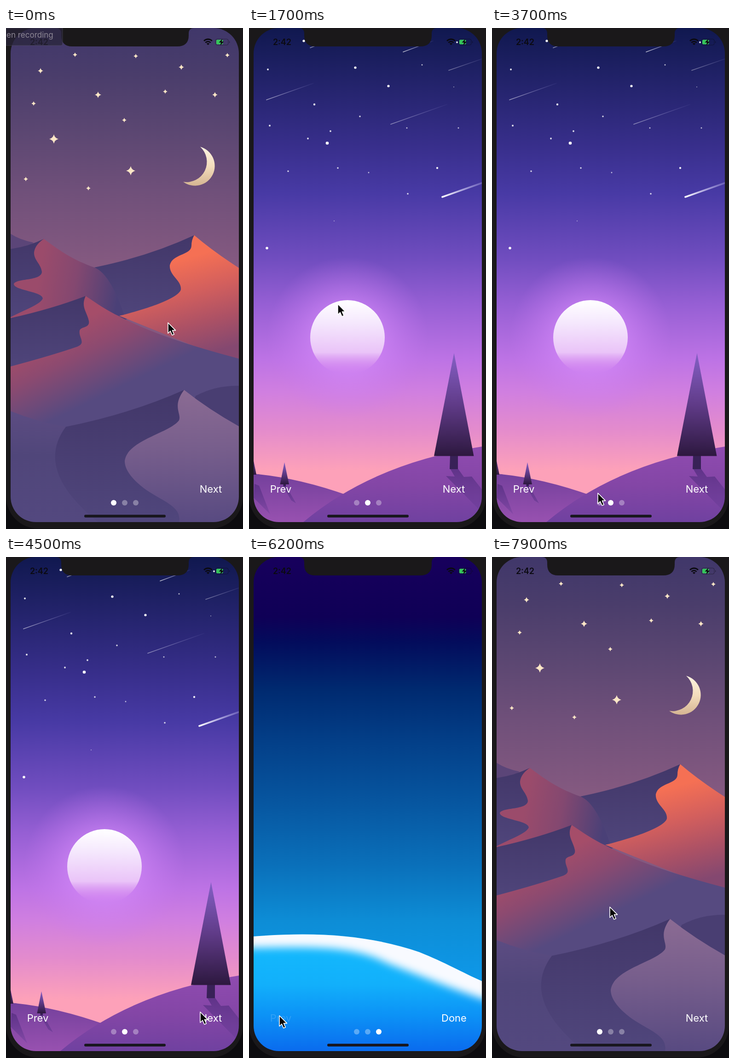
Recreate the animation shown at these times as an HTML page. Size 515 by 1088 pixels, loop 8 s.

```html
<!DOCTYPE html>
<html lang="en">
<head>
<meta charset="utf-8">
<title>Onboarding pages</title>
<style>
html, body { margin: 0; width: 100%; height: 100%; overflow: hidden; background: #1a181a; }
svg { display: block; width: 515px; height: 1088px; font-family: Inter, Roboto, sans-serif; }
.label { font-size: 22px; fill: #fff; text-anchor: middle; }
.strip, .cursor, .tip, .dot, .press { animation: 8s infinite; }
.strip { animation-name: swipe; animation-timing-function: ease-out; }
.cursor { animation-name: point; animation-timing-function: ease-in-out; }
.tip { animation-name: tip; animation-timing-function: linear; }
.dot { fill: #fff; fill-opacity: .33; animation-timing-function: step-end; }
.press { animation-timing-function: step-end; }
.d0 { animation-name: dot0; }
.d1 { animation-name: dot1; }
.d2 { animation-name: dot2; }
.n0 { animation-name: next0; }
.n1 { animation-name: next1; }
.p1 { animation-name: prev1; }
.p2 { animation-name: prev2; }
@keyframes swipe {
  0%, 1.5% { transform: translateX(0); }
  6.5% { transform: translateX(-486px); }
  8% { transform: translateX(-504px); }
  8.7%, 9.4% { transform: translateX(-556px); }
  13%, 17% { transform: translateX(-992px); }
  21%, 22.5% { transform: translateX(-496px); }
  27%, 37.5% { transform: translateX(0); }
  41.25%, 58% { transform: translateX(-496px); }
  62%, 78.2% { transform: translateX(-992px); }
  82%, 87% { transform: translateX(-496px); }
  91%, 100% { transform: translateX(0); }
}
@keyframes point {
  0%, 1.2% { transform: translate(352px, 640px); }
  6%, 18% { transform: translate(-60px, 650px); }
  22.5% { transform: translate(240px, 590px); }
  28%, 32% { transform: translate(418px, 568px); }
  36%, 41% { transform: translate(445px, 996px); }
  46.25%, 47% { transform: translate(230px, 1010px); }
  50% { transform: translate(150px, 1005px); }
  56%, 65% { transform: translate(422px, 988px); }
  76%, 88% { transform: translate(66px, 996px); }
  98%, 100% { transform: translate(256px, 760px); }
}
@keyframes tip { 0%, .8% { opacity: 1; } 3%, 100% { opacity: 0; } }
@keyframes dot0 { 0%, 27%, 91% { fill-opacity: 1; } 13%, 41.25% { fill-opacity: .33; } }
@keyframes dot1 { 0%, 27%, 62%, 91% { fill-opacity: .33; } 21%, 41.25%, 82% { fill-opacity: 1; } }
@keyframes dot2 { 0%, 21%, 82% { fill-opacity: .33; } 13%, 62% { fill-opacity: 1; } }
@keyframes next0 { 0%, 37.5% { opacity: 1; } 36.5% { opacity: .15; } }
@keyframes next1 { 0%, 58% { opacity: 1; } 57% { opacity: .15; } }
@keyframes prev1 { 0%, 87% { opacity: 1; } 86% { opacity: .15; } }
@keyframes prev2 { 0%, 78.6% { opacity: 1; } 77% { opacity: .15; } }
</style>
</head>
<body>
<svg viewBox="0 0 515 1088">
  <defs>
    <clipPath id="screen"><rect x="10" width="496" height="1073" rx="55"/></clipPath>
    <clipPath id="page"><rect x="10" width="496" height="1073"/></clipPath>
    <clipPath id="planet"><use href="#dome"/></clipPath>
    <filter id="soft" x="-20%" y="-50%" width="140%" height="200%"><feGaussianBlur stdDeviation="9"/></filter>

    <linearGradient id="dusk" gradientUnits="userSpaceOnUse" x1="0" y1="0" x2="0" y2="510">
      <stop stop-color="#40376a"/><stop offset=".2" stop-color="#4a3d6b"/>
      <stop offset=".45" stop-color="#5c4772"/><stop offset=".7" stop-color="#70507a"/>
      <stop offset="1" stop-color="#845980"/>
    </linearGradient>
    <linearGradient id="crescent" x2="0" y2="1">
      <stop stop-color="#fdf3e2"/><stop offset=".5" stop-color="#f3dcbc"/><stop offset="1" stop-color="#d5b592"/>
    </linearGradient>
    <linearGradient id="shade" x2="0" y2="1">
      <stop stop-color="#423769"/><stop offset="1" stop-color="#50467c"/>
    </linearGradient>
    <linearGradient id="rose" gradientUnits="userSpaceOnUse" x1="70" y1="545" x2="245" y2="575">
      <stop stop-color="#9b4b6b"/><stop offset=".45" stop-color="#844870"/><stop offset="1" stop-color="#4a4077"/>
    </linearGradient>
    <linearGradient id="ember" gradientUnits="userSpaceOnUse" x1="370" y1="505" x2="425" y2="710">
      <stop stop-color="#f57054"/><stop offset=".35" stop-color="#d35f5d"/>
      <stop offset=".68" stop-color="#ac5165"/><stop offset="1" stop-color="#844870"/>
    </linearGradient>
    <linearGradient id="slope" gradientUnits="userSpaceOnUse" x1="150" y1="640" x2="224" y2="792">
      <stop stop-color="#a54d69"/><stop offset=".4" stop-color="#8c4a70"/><stop offset="1" stop-color="#564a80"/>
    </linearGradient>
    <linearGradient id="floor" x2="0" y2="1">
      <stop stop-color="#5c4c82"/><stop offset=".4" stop-color="#50467a"/><stop offset="1" stop-color="#53487f"/>
    </linearGradient>
    <linearGradient id="lilac" x2="0" y2="1">
      <stop stop-color="#8b6b93"/><stop offset=".45" stop-color="#775e8c"/><stop offset="1" stop-color="#584a81"/>
    </linearGradient>

    <linearGradient id="violet" gradientUnits="userSpaceOnUse" x1="0" y1="0" x2="0" y2="1000">
      <stop stop-color="#10184f"/><stop offset=".12" stop-color="#23236b"/><stop offset=".25" stop-color="#372e8a"/>
      <stop offset=".36" stop-color="#483aa5"/><stop offset=".5" stop-color="#704dbf"/>
      <stop offset=".6" stop-color="#965fd4"/><stop offset=".72" stop-color="#bd73e5"/>
      <stop offset=".79" stop-color="#d07fe0"/><stop offset=".87" stop-color="#e38bcd"/>
      <stop offset=".96" stop-color="#fda1b9"/>
    </linearGradient>
    <radialGradient id="glow"><stop offset=".4" stop-color="#d489fa" stop-opacity=".65"/><stop offset="1" stop-color="#c878f0" stop-opacity="0"/></radialGradient>
    <linearGradient id="fullmoon" x2="0" y2="1">
      <stop stop-color="#fff"/><stop offset=".3" stop-color="#f5e8fd"/>
      <stop offset=".7" stop-color="#eac4f8"/><stop offset=".98" stop-color="#d685ea" stop-opacity="0"/>
    </linearGradient>
    <linearGradient id="streak" y1="1" x2="1" y2="0"><stop stop-color="#fff"/><stop offset="1" stop-color="#b9b0f5" stop-opacity=".1"/></linearGradient>
    <linearGradient id="hill" x2="0" y2="1"><stop stop-color="#8f4bb0"/><stop offset=".5" stop-color="#8446a6"/><stop offset="1" stop-color="#7041a0"/></linearGradient>
    <linearGradient id="farhill" x2="0" y2="1"><stop stop-color="#74409c"/><stop offset="1" stop-color="#9851b0"/></linearGradient>
    <linearGradient id="pine" x2="0" y2="1"><stop stop-color="#8560c6"/><stop offset=".5" stop-color="#603b88"/><stop offset="1" stop-color="#2d183f"/></linearGradient>
    <linearGradient id="cast" x2="0" y2="1"><stop stop-color="#5f3388"/><stop offset="1" stop-color="#653a94" stop-opacity=".3"/></linearGradient>

    <linearGradient id="space" gradientUnits="userSpaceOnUse" x1="0" y1="0" x2="0" y2="930">
      <stop stop-color="#17005c"/><stop offset=".14" stop-color="#0f0056"/><stop offset=".2" stop-color="#030c5c"/>
      <stop offset=".31" stop-color="#002a70"/><stop offset=".43" stop-color="#033f88"/>
      <stop offset=".58" stop-color="#0757a1"/><stop offset=".72" stop-color="#0a70ba"/>
      <stop offset=".85" stop-color="#0d8dd6"/><stop offset="1" stop-color="#0e99ea"/>
    </linearGradient>
    <linearGradient id="sea" gradientUnits="userSpaceOnUse" x1="0" y1="850" x2="0" y2="1073">
      <stop stop-color="#13b8fd"/><stop offset=".35" stop-color="#12b0fb"/><stop offset=".65" stop-color="#0c92f6"/><stop offset="1" stop-color="#0a6bee"/>
    </linearGradient>
    <path id="dome" d="M10 824 C160 812 270 824 370 858 C425 880 465 903 506 921 V1073 H10Z"/>
  </defs>

  <path d="M0 0H515V1088H0Z" fill="#0d0c0f"/>
  <rect y="-80" width="515" height="1167" rx="70" fill="#1a181a"/>

  <g clip-path="url(#screen)">
    <g class="strip">
      <g clip-path="url(#page)">
        <path d="M10 0H506V1073H10Z" fill="url(#dusk)"/>
        <g id="sparkles" fill="#fbe6c6"></g>
        <path d="M422 258A43 43 0 1 1 385 334A44 44 0 0 0 422 258Z" fill="url(#crescent)"/>
        <path d="M10 447Q30 460 60 466L10 500Z" fill="#5b4578"/>
        <path d="M192 520Q310 496 409 450L420 560L246 640H150Z" fill="url(#shade)"/>
        <path d="M10 480Q50 474 82 458L110 600L10 640Z" fill="url(#shade)"/>
        <path d="M82 458C110 478 140 502 192 520Q230 535 262 640L10 700V628C40 612 76 600 80 587C78 572 18 570 17 556C22 543 76 550 78 530C76 512 60 504 61 487Q63 471 82 458Z" fill="url(#rose)"/>
        <path d="M409 450Q450 485 506 521V730L246 625C300 612 375 588 380 568C382 548 354 538 356 515C362 490 402 494 403 473Q403 460 409 450Z" fill="url(#ember)"/>
        <path d="M10 630Q100 610 173 582L195 660L150 720L10 750Z" fill="url(#shade)"/>
        <path d="M173 582C200 600 220 614 246 626Q330 672 506 718V920H10V735Q100 711 155 692C175 684 157 672 160 657C163 648 183 652 180 636C176 616 162 606 173 582Z" fill="url(#slope)"/>
        <path d="M10 832Q70 856 130 866L300 850L506 900V1073H10Z" fill="url(#floor)"/>
        <path d="M412 799Q455 776 506 777V900L400 830Z" fill="#493e72"/>
        <path d="M130 866Q270 838 387 786L400 1073H200Q60 960 130 866Z" fill="url(#shade)"/>
        <path d="M387 786Q440 828 506 865V1073H376C382 1040 345 1030 306 1004C278 984 258 962 258 940C264 895 355 880 376 852C382 837 360 822 387 786Z" fill="url(#lilac)"/>
        <text class="label press n0" x="445" y="1009">Next</text>
      </g>

      <g transform="translate(496)">
        <g clip-path="url(#page)">
          <path d="M10 0H506V1073H10Z" fill="url(#violet)"/>
          <g id="stars" fill="#fff"></g>
          <g stroke="url(#streak)" stroke-width="1.6" stroke-linecap="round">
            <path d="M38 156L140 120" opacity=".55"/>
            <path d="M308 209L430 166" opacity=".45"/>
            <path d="M335 52L400 28" opacity=".7"/>
            <path d="M434 92L515 64" opacity=".4"/>
            <path d="M133 43L180 25" opacity=".5"/>
            <path d="M420 367L530 328" stroke-width="3.6"/>
          </g>
          <circle cx="214" cy="672" r="175" fill="url(#glow)"/>
          <circle cx="214" cy="672" r="81" fill="url(#fullmoon)"/>
          <path d="M10 968Q105 976 215 1015V1073H10Z" fill="url(#farhill)"/>
          <path d="M12 990L22 994L46 1056L10 1020ZM74 995H81L102 1032L92 1026Z" fill="url(#cast)"/>
          <path d="M4 910L-8 970H16Z" fill="url(#pine)"/>
          <path d="M77 943L67.500 991H87Z" fill="url(#pine)"/>
          <path d="M74.500 991H80V995H74.500Z" fill="#341f52"/>
          <path d="M118 1073Q270 945 506 909V1073Z" fill="url(#hill)"/>
          <path d="M437 957H454L467 975L484 974L506 1002V1052L428 973L447 974Z" fill="url(#cast)"/>
          <path d="M437 929H454V958H436Z" fill="#382157"/>
          <path d="M445.500 706L402 929.500H488.500Z" fill="url(#pine)"/>
          <text class="label press p1" x="69" y="1009">Prev</text>
          <text class="label press n1" x="445" y="1009">Next</text>
        </g>
      </g>

      <g transform="translate(992)">
        <g clip-path="url(#page)">
          <path d="M10 0H506V1073H10Z" fill="url(#space)"/>
          <use href="#dome" fill="url(#sea)"/>
          <g clip-path="url(#planet)">
            <path d="M-40 800H380L560 900V976C470 950 380 912 300 882C225 843 140 846 -40 850Z" fill="#f8faff" filter="url(#soft)"/>
          </g>
          <text class="label press p2" x="69" y="1009">Prev</text>
          <text class="label" x="445.500" y="1009">Done</text>
        </g>
      </g>
    </g>

    <circle class="dot d0" cx="234" cy="1031" r="6"/>
    <circle class="dot d1" cx="258" cy="1031" r="6"/>
    <circle class="dot d2" cx="282" cy="1031" r="6"/>
    <rect x="170" y="1057" width="177" height="6" rx="3" fill="#19171f"/>

    <text x="72" y="37" font-size="18" font-weight="600" text-anchor="middle" fill="#0b0a10">2:42</text>
    <g fill="none" stroke="#0b0a10" stroke-width="2.700">
      <path d="M430 28Q439 20.500 448 28M433.300 31.800Q439 27 444.700 31.800"/>
      <path d="M439 37L435.800 34Q439 31.500 442.200 34Z" fill="#0b0a10" stroke="none"/>
    </g>
    <rect x="455.500" y="24" width="27.500" height="13" rx="3.500" fill="none" stroke="#0b0a10" stroke-opacity=".45"/>
    <path d="M485 28.500Q488 30.500 485 33Z" fill="#0b0a10" fill-opacity=".45"/>
    <rect x="457" y="25.500" width="14.500" height="10" rx="2" fill="#36c65c"/>
    <path d="M470 23.500L462.500 31.500H467L465.500 38L473.500 29.500H468.700Z" fill="#0b0a10"/>
  </g>

  <path d="M108 0Q120 0 120 12V16Q120 40 144 40H372Q397 40 397 16V12Q397 0 409 0Z" fill="#1a181a"/>

  <g class="tip">
    <path d="M0 0H123V34Q123 38 119 38H0Z" fill="#29243a" fill-opacity=".72" stroke="#5b5666" stroke-opacity=".5"/>
    <text x="1" y="21" font-size="17" fill="#8d8794">en recording</text>
  </g>

  <g class="cursor">
    <path d="M0 0V23L5.200 18.200L9 27L13.200 25.200L9.500 16.600H16.500Z" fill="#050505" stroke="#fff" stroke-width="1.600" stroke-linejoin="round"/>
  </g>
</svg>
<script>
const SVG = "http://www.w3.org/2000/svg";
const add = (parent, tag, attrs) => {
  const el = document.createElementNS(SVG, tag);
  for (const key in attrs) el.setAttribute(key, attrs[key]);
  document.getElementById(parent).append(el);
};

const sparkles = [[75, 93, 6], [150, 58, 5], [282, 61, 5], [381, 85, 6], [481, 59, 5],
  [60, 164, 5], [200, 145, 7], [346, 138, 5], [454, 145, 6], [257, 200, 5],
  [104, 241, 10], [271, 310, 10], [43, 328, 5], [179, 348, 5]];
for (const [x, y, r] of sparkles) {
  const k = r * .2;
  add("sparkles", "path", {
    transform: `translate(${x} ${y})`,
    d: `M0 ${-r}Q${k} ${-k} ${r} 0Q${k} ${k} 0 ${r}Q${-k} ${k} ${-r} 0Q${-k} ${-k} 0 ${-r}Z`
  });
}

const stars = [[41, 90, 2], [231, 86, 2.6], [303, 126, 2.6], [376, 80, 1.5], [119, 28, 2.6],
  [142, 166, 2.2], [241, 192, 1.8], [177, 224, 1.9], [128, 240, 1.9], [170, 250, 3.3],
  [45, 212, 2], [343, 217, 1.5], [455, 217, 1.5], [85, 311, 1.8], [193, 304, 1.8],
  [260, 314, 1.4], [409, 304, 2.2], [345, 360, 1.8], [185, 419, 1], [39, 478, 2.8],
  [452, 31, 2], [445, 128, 1]];
for (const [cx, cy, r] of stars) add("stars", "circle", { cx, cy, r, opacity: Math.min(1, .25 + r * .3) });
</script>
</body>
</html>
```
